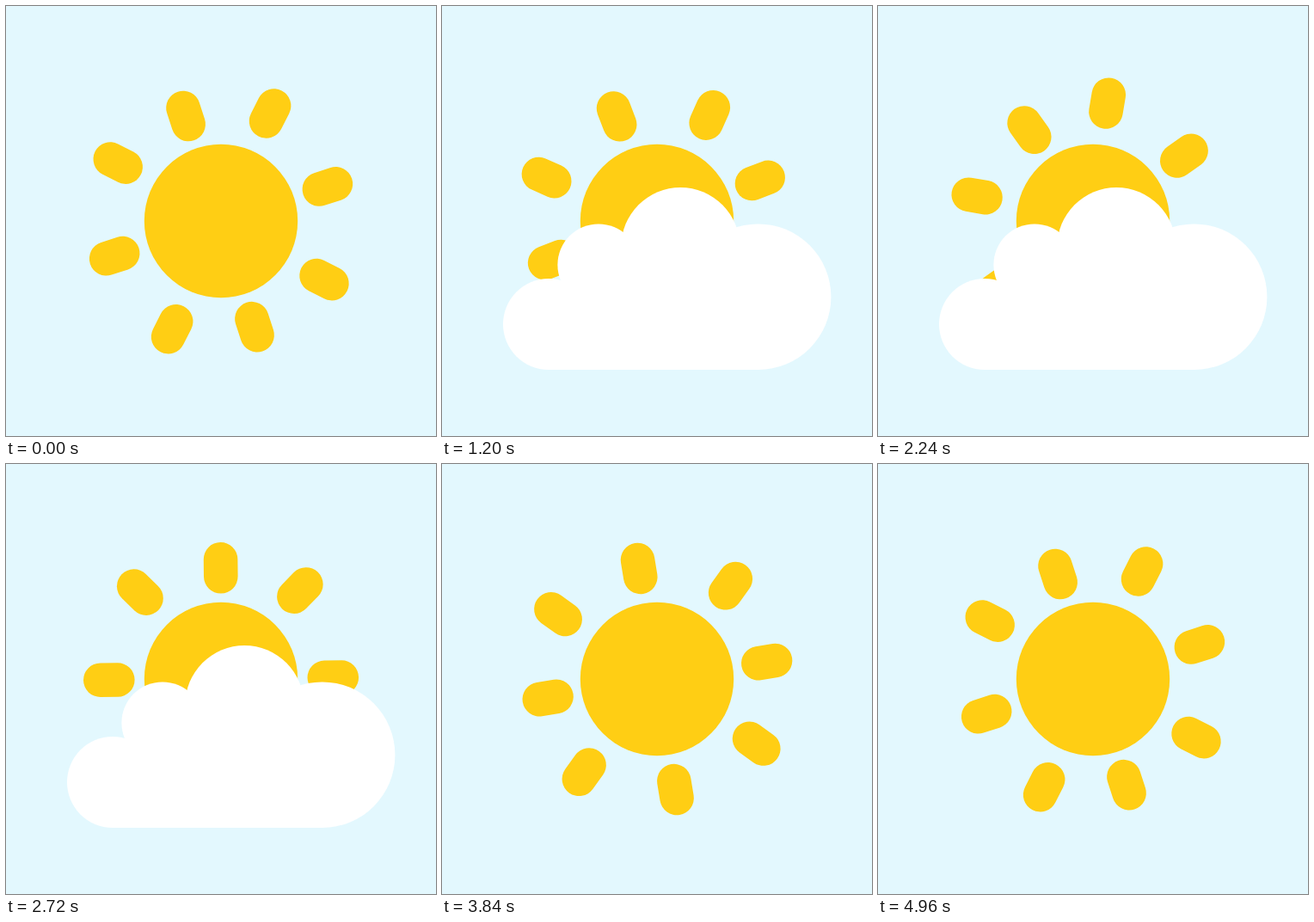
An HTML page for the animation above (5000 ms loop, 500 by 500 pixels).

```html
<!DOCTYPE html>
<html lang="en">
<head>
<meta charset="utf-8">
<title>Sun and cloud</title>
<style>
html, body { margin: 0; width: 100%; height: 100%; overflow: hidden; background: #e3f8fe; }
svg { display: block; width: 100%; height: 100%; }
</style>
</head>
<body>
<svg viewBox="0 0 500 500">
  <rect width="500" height="500" fill="#e3f8fe"/>
  <g fill="#ffce14">
    <circle cx="250" cy="250" r="89.2"/>
    <g id="rays"></g>
  </g>
  <g id="cloud" fill="#fff">
    <circle cx="124" cy="370" r="53"/>
    <circle cx="182" cy="301" r="47.6"/>
    <circle cx="277.3" cy="280" r="69"/>
    <circle cx="367.6" cy="338.2" r="84.8"/>
    <path d="M124 370L182 301L277 280L368 338V423H124Z"/>
  </g>
</svg>
<script>
const FRAME = 40, FRAMES = 125, TURN = 124;
const START_ANGLE = -18.05;
const ENTER = { from: 0, to: 20, dist: 476 };
const EXIT = { from: 68, to: 98, dist: 525 };

const rays = document.getElementById('rays');
const cloud = document.getElementById('cloud');

// x, y from the sun's centre, and tilt
const layout = [
  [-1.1, -128.7, 0], [93, -101.2, 45], [130.2, 0.3, 90], [93, 101.9, 135],
  [-1.1, 129.2, 0], [-93, 101.9, 45], [-130.3, 0.3, 90], [-93, -101.2, 135]
];
const W = 39.6, H = 59.6;

for (const [x, y, tilt] of layout) {
  const ray = document.createElementNS('http://www.w3.org/2000/svg', 'rect');
  const attrs = {
    x: -W / 2, y: -H / 2, width: W, height: H, rx: W / 2,
    transform: `translate(${x} ${y}) rotate(${tilt})`
  };
  for (const key in attrs) ray.setAttribute(key, attrs[key]);
  rays.appendChild(ray);
}

function ease(f, { from, to }) {
  const p = Math.min(1, Math.max(0, (f - from) / (to - from)));
  return p * p * (3 - 2 * p);
}

function draw(ms) {
  const f = Math.floor(ms / FRAME + 0.01) % FRAMES;
  const angle = START_ANGLE + 360 * f / TURN;
  const shift = ENTER.dist * (1 - ease(f, ENTER)) - EXIT.dist * ease(f, EXIT);
  rays.setAttribute('transform', `translate(250 250) rotate(${angle})`);
  cloud.setAttribute('transform', `translate(${shift} 0)`);
}

function tick() {
  draw(performance.now());
  requestAnimationFrame(tick);
}
tick();
</script>
</body>
</html>
```
